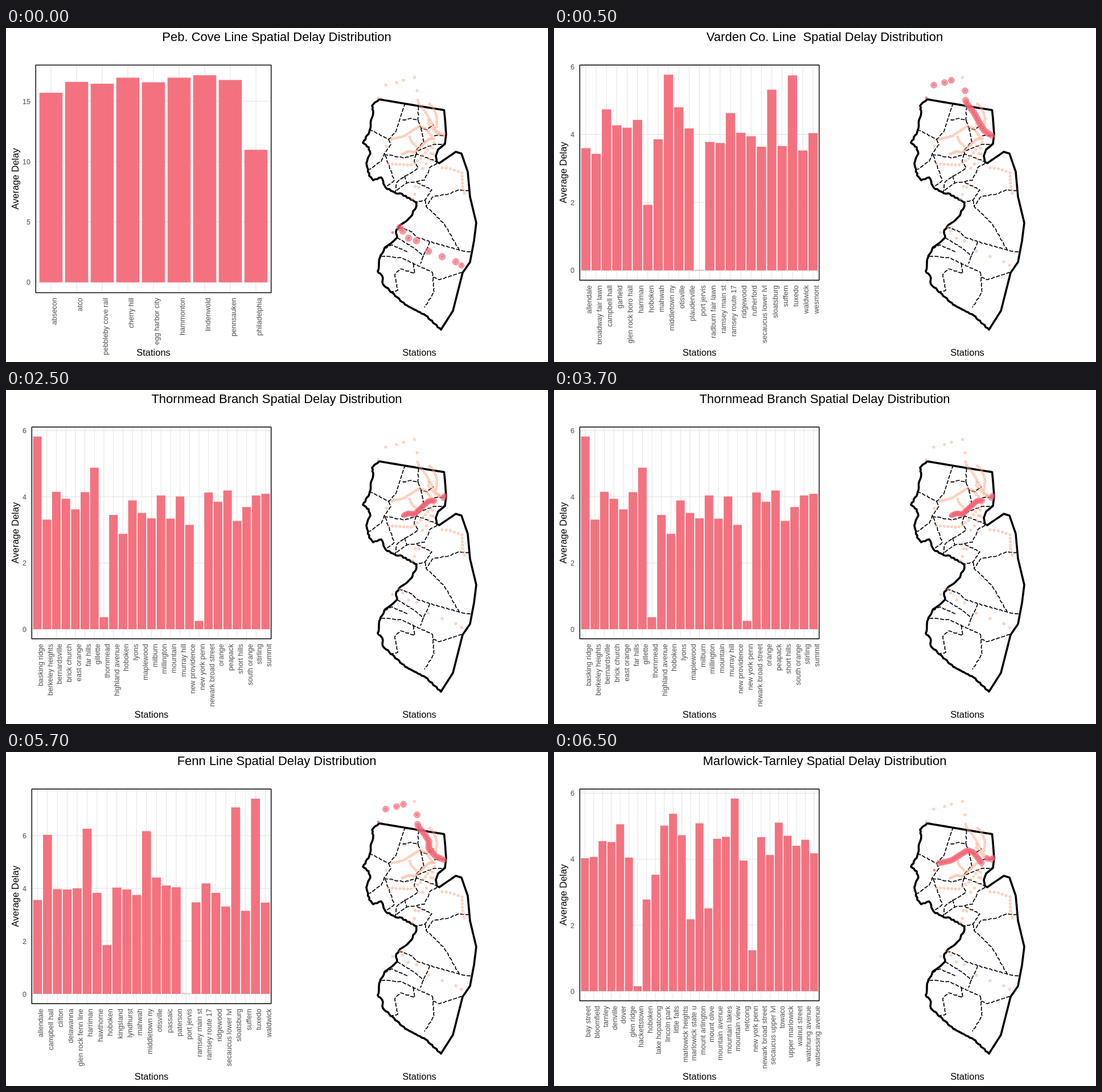
An HTML page with a canvas for the animation above (8000 ms loop, 952 px wide and 588 px high).

```html
<!DOCTYPE html>
<html lang="en">
<head>
<meta charset="utf-8">
<title>Spatial delay distribution</title>
<style>
html, body { margin: 0; width: 100%; height: 100%; overflow: hidden; background: #fff; }
canvas { display: block; width: 952px; height: 588px; }
</style>
</head>
<body>
<canvas id="stage" width="952" height="588"></canvas>
<script>
const ctx = document.getElementById('stage').getContext('2d');
const FONT = '"Liberation Sans", Arial, sans-serif';
const PINK = '#f4727f', GREY = '#4d4d4d';
const RIGHT = 466, TOP = 65, LOOP = 8000;

const pairs = flat => flat.flatMap((x, i) => i % 2 ? [] : [[x, flat[i + 1]]]);
const at = (...flat) => pairs(flat);

// n points spread evenly over a polyline
function along(n, ...flat) {
  const pts = pairs(flat);
  const lens = pts.slice(1).map(([x, y], i) => Math.hypot(x - pts[i][0], y - pts[i][1]));
  const gap = lens.reduce((a, b) => a + b) / (n - 1);
  return Array.from({ length: n }, (_, k) => {
    let d = k * gap, i = 0;
    while (i < lens.length - 1 && d > lens[i]) d -= lens[i++];
    const u = d / lens[i], [a, b] = [pts[i], pts[i + 1]];
    return [a[0] + (b[0] - a[0]) * u, a[1] + (b[1] - a[1]) * u];
  });
}

const tail = at(654,123, 667,100.5, 686,96, 698,92, 722,110.5);
const shore = at(679,360, 692,351, 697,357.5, 707,370, 721,374.5, 742,393, 766,402.5, 790,411.5, 800,418);
const north = [...tail, ...along(16, 723,127, 725,133, 737,148, 755,180, 769,190)];
const hills = [...along(19, 696,222, 707,217, 717,219, 743,195, 752,195), ...at(768,190, 770,186)];
const central = [...tail, ...along(17, 723,127, 725,133, 734,143, 743,157, 742,170, 755,184, 769,190)];
const lakes = [...at(668,208), ...along(20, 677,195.5, 698,191, 726,173, 736,176, 751,195),
  ...at(761,187.5, 768,189, 771,186)];
const otherStops = [
  ...at(717.5,87, 714,301, 717.5,293, 719,279, 725,280, 750,222),
  ...along(10, 744,134, 751,141, 757,157, 756,174),
  ...along(5, 709,192, 712,200, 720,208),
  ...along(14, 672,239, 711,241.5, 729,229, 745,209),
  ...along(6, 732,247, 742,235, 752,202),
  ...along(6, 766,246, 778,247, 801,255),
  ...along(7, 801,255, 802,279, 805,291)
];
const allStops = [otherStops, shore, north, hills, central, lakes].flat();

const views = [];
function addView(until, title, stops, r, left, bottom, tickStep, names, ...bars) {
  views.push({ until, title, stops, r, left, bottom, tickStep, names: names.split(','), bars });
}
addView(500, 'Peb. Cove Line', shore, 6.4, 52, 466, 5,
  'absecon,atco,pebbleby cove rail,cherry hill,egg harbor city,hammonton,lindenwold,pennsauken,philadelphia',
  15.7, 16.6, 16.45, 16.95, 16.57, 16.95, 17.15, 16.76, 10.98);
addView(2500, 'Varden Co. Line ', north, 6, 45, 444, 2,
  'allendale,broadway fair lawn,campbell hall,garfield,glen rock boro hall,harriman,hoboken,mahwah,middletown ny,otisville,plauderville,port jervis,radburn fair lawn,ramsey main st,ramsey route 17,ridgewood,rutherford,secaucus lower lvl,sloatsburg,suffern,tuxedo,waldwick,wesmont',
  3.6, 3.43, 4.74, 4.27, 4.2, 4.43, 1.93, 3.86, 5.76, 4.8, 4.18, .015, 3.78, 3.75, 4.63,
  4.05, 3.95, 3.64, 5.32, 3.66, 5.74, 3.53, 4.04);
addView(4500, 'Thornmead Branch', hills, 5.3, 45, 438, 2,
  'basking ridge,berkeley heights,bernardsville,brick church,east orange,far hills,gillette,thornmead,highland avenue,hoboken,lyons,maplewood,milburn,millington,mountain,murray hill,new providence,new york penn,newark broad street,orange,peapack,short hills,south orange,stirling,summit',
  5.82, 3.31, 4.15, 3.94, 3.62, 4.14, 4.88, .36, 3.45, 2.88, 3.89, 3.51, 3.35, 4.04, 3.34,
  4.01, 3.15, .25, 4.13, 3.85, 4.19, 3.27, 3.69, 4.04, 4.09);
addView(6500, 'Fenn Line', central, 6, 45, 443, 2,
  'allendale,campbell hall,clifton,delawanna,glen rock fenn line,harriman,hawthorne,hoboken,kingsland,lyndhurst,mahwah,middletown ny,otisville,passaic,paterson,port jervis,ramsey main st,ramsey route 17,ridgewood,secaucus lower lvl,sloatsburg,suffern,tuxedo,waldwick',
  3.56, 6.03, 3.97, 3.96, 4, 6.26, 3.83, 1.85, 4.03, 3.96, 3.75, 6.17, 4.41, 4.11, 4.04, .015,
  3.47, 4.19, 3.83, 3.31, 7.07, 3.15, 7.4, 3.46);
addView(LOOP, 'Marlowick-Tarnley', lakes, 5.7, 45, 438, 2,
  'bay street,bloomfield,tarnley,denville,dover,glen ridge,hackettstown,hoboken,lake hopatcong,lincoln park,little falls,marlowick heights,marlowick state u,mount arlington,mount olive,mountain avenue,mountain lakes,mountain view,netcong,new york penn,newark broad street,secaucus upper lvl,towaco,upper marlowick,walnut street,watchung avenue,watsessing avenue',
  4.03, 4.07, 4.55, 4.52, 5.06, 4.05, .15, 2.78, 3.53, 5.02, 5.38, 4.73, 2.18, 5.09, 2.51, 4.62,
  4.68, 5.84, 3.96, 1.24, 4.67, 4.13, 5.11, 4.71, 4.41, 4.59, 4.18);

// Polyline in short steps, with a small ripple of height amp
function trace(amp, ...flat) {
  const pts = pairs(flat);
  ctx.lineTo(...pts[0]);
  for (let i = 1; i < pts.length; i++) {
    const [x0, y0] = pts[i - 1], dx = pts[i][0] - x0, dy = pts[i][1] - y0;
    const len = Math.hypot(dx, dy), steps = Math.ceil(len / 4);
    for (let k = 1; k <= steps; k++) {
      const x = x0 + dx * k / steps, y = y0 + dy * k / steps;
      const d = k < steps ? amp * Math.sin(x * 1.7 + y * 2.3) / len : 0;
      ctx.lineTo(x - dy * d, y + dx * d);
    }
  }
}

function border(...flat) {
  ctx.beginPath();
  trace(.7, ...flat);
  ctx.stroke();
}

function text(str, x, y, size, { align = 'center', color = '#000', turn = false } = {}) {
  ctx.save();
  ctx.translate(x, y);
  if (turn) ctx.rotate(-Math.PI / 2);
  ctx.font = `${size}px ${FONT}`;
  ctx.textAlign = align;
  ctx.fillStyle = color;
  ctx.fillText(str, 0, 0);
  ctx.restore();
}

function line(x0, y0, x1, y1) {
  ctx.beginPath();
  ctx.moveTo(x0, y0);
  ctx.lineTo(x1, y1);
  ctx.stroke();
}

function dots(pts, radius, rgb, fill, edge) {
  ctx.fillStyle = `rgba(${rgb},${fill})`;
  ctx.strokeStyle = `rgba(${rgb},${edge})`;
  ctx.lineWidth = 1;
  pts.forEach(([x, y], i) => {
    ctx.beginPath();
    ctx.arc(x, y, radius(i), 0, 2 * Math.PI);
    ctx.fill();
    ctx.stroke();
  });
}

function drawChart({ left, bottom, tickStep, names, bars }) {
  const step = (RIGHT - left) / (bars.length + .2), span = (bottom - TOP) / 1.1;
  const max = Math.max(...bars), zero = bottom - span * .05, unit = span / max;
  const xAt = i => left + step * (i + .6), yAt = v => zero - v * unit;

  ctx.strokeStyle = '#e2e2e2';
  ctx.lineWidth = 1;
  for (let v = 0; v <= max * 1.05; v += tickStep) {
    line(left, yAt(v), RIGHT, yAt(v));
    text(v, left - 9, yAt(v) + 4.7, 12.5, { align: 'right', color: GREY });
  }
  bars.forEach((v, i) => line(xAt(i), TOP, xAt(i), bottom));
  ctx.fillStyle = PINK;
  bars.forEach((v, i) => ctx.fillRect(xAt(i) - step * .45, yAt(v), step * .9, v * unit));
  names.forEach((name, i) =>
    text(name, xAt(i) + 10, bottom + 9, 12.5, { align: 'right', color: GREY, turn: true }));

  ctx.strokeStyle = '#000';
  ctx.lineWidth = 1.4;
  ctx.strokeRect(left + .3, TOP + .3, RIGHT - left - .6, bottom - TOP - .3);
  text('Average Delay', 22, (TOP + bottom) / 2, 16.5, { turn: true });
  text('Stations', (left + RIGHT) / 2, 576.5, 16.5);
}

function drawCounties() {
  border(638,178, 672,196, 684,184, 701,134);
  border(672,196, 676,205, 664,222, 659,235, 638,249);
  border(664,222, 700,229, 722,222, 756,235);
  border(666,224, 682,268, 668,280);
  border(724,138, 724,163, 711,159, 695,163);
  border(724,163, 729,176, 740,179, 751,170);
  border(729,176, 734,200, 722,213, 721,222);
  border(723,216, 748,206, 771,204);
  border(752,190, 773,188);
  border(721,222, 717,235, 724,246, 687,271, 683,290);
  border(700,260, 704,273, 685,287);
  border(757,238, 745,245, 735,268, 704,273);
  border(722,272, 748,285, 736,303, 722,306);
  border(814,286, 795,285, 778,292, 750,297, 738,314);
  border(736,303, 738,314, 770,345, 796,391);
  border(816,394, 796,391, 744,376);
  border(690,350, 714,359, 721,368, 744,376);
  border(687,369, 715,386, 734,402);
  border(744,376, 728,415);
  border(665,388, 678,382, 705,394);
  border(659,402, 693,404, 749,430);
  border(715,415, 718,432, 693,424, 683,434, 688,462, 678,464);
  border(749,430, 752,465, 735,492);
  border(750,439, 762,443, 804,429);
}

function drawState() {
  ctx.beginPath();
  trace(0, 655,125.5, 735,139, 769.5,144.5, 771,159, 773,187, 771,204, 759,214, 755,225, 757,236, 761,238,
    790,218, 800,221, 811,253, 815,297, 826,343, 822,375, 815,412, 802,431, 785,498, 764,531);
  trace(.9, 764,531, 737,506, 701,487, 662,451, 661,437, 653,428, 657,404, 665,387, 687,369, 685,358, 690,350,
    711,332, 721,313, 721,307, 692,291, 685,291, 667,281, 659,263, 645,268, 638,260, 633,238, 640,221,
    637,210, 627,202, 638,183, 645,146, 643,137, 655,125.5);
  ctx.closePath();
  ctx.stroke();
}

function drawMap({ stops, r }) {
  ctx.strokeStyle = '#000';
  ctx.lineJoin = 'round';
  ctx.lineWidth = 1.7;
  ctx.setLineDash([7, 2.5]);
  drawCounties();
  ctx.setLineDash([]);
  ctx.lineWidth = 3.6;
  drawState();

  // Stations shared by several routes are drawn once
  const seen = [...stops], pale = [];
  for (const p of allStops) {
    if (seen.some(q => Math.hypot(p[0] - q[0], p[1] - q[1]) < 2)) continue;
    seen.push(p);
    pale.push(p);
  }
  dots(pale, () => 2.2, '255,160,122', .4, .45);
  // The first stop of each route has the least delay
  const size = i => i === 0 ? 2.2 : i === stops.length - 1 ? r * .85 : r;
  dots(stops, i => size(i) - .5, '244,100,116', .62, .55);
  dots(stops, () => 2, '240,95,112', .45, .35);
  text('Stations', 726, 576.5, 16.5);
}

function draw(view) {
  ctx.fillStyle = '#fff';
  ctx.fillRect(0, 0, 952, 588);
  text(view.title + ' Spatial Delay Distribution', 475.5, 22.5, 22);
  drawChart(view);
  drawMap(view);
}

let shown;
function tick() {
  const t = performance.now() % LOOP;
  const view = views.find(v => t < v.until);
  if (view !== shown) draw(shown = view);
  requestAnimationFrame(tick);
}
tick();
</script>
</body>
</html>
```
